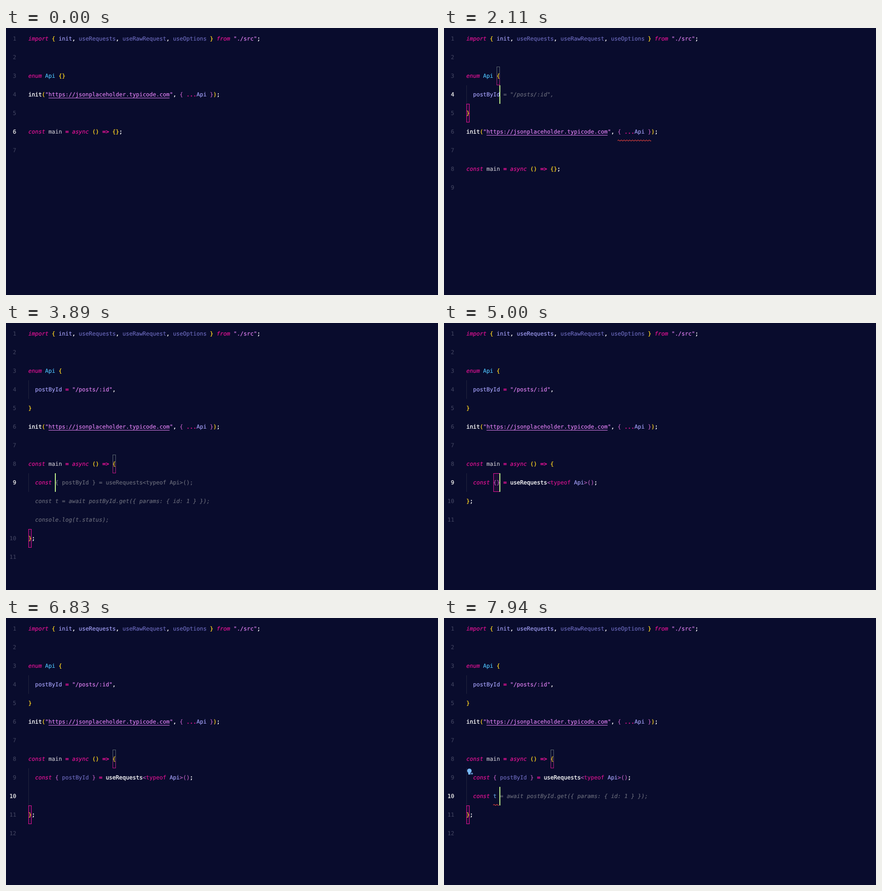
Recreate the animation shown at these times as an HTML page. Size 928 by 574 pixels, loop 8000 ms.

```html
<!DOCTYPE html>
<html lang="en">
<head>
<meta charset="utf-8">
<title>Typed API client</title>
<style>
  html, body { margin: 0; width: 100%; height: 100%; overflow: hidden; background: #090c2d; }
  svg { display: block; width: 928px; height: 574px; }
  text {
    font: 12px "DejaVu Sans Mono", "Liberation Mono", monospace;
    white-space: pre; text-rendering: geometricPrecision;
    stroke: currentColor; fill: currentColor; stroke-width: .15px;
  }
  .k { color: #f0139b; font-style: italic; }
  .p { color: #f0139b; stroke-width: .4px; }
  .q { color: #d9148f; }
  .y { color: #ffd61f; stroke-width: .3px; }
  .w { color: #fff; stroke-width: .35px; }
  .l { color: #a9a5ff; }
  .d { color: #6e6cc0; }
  .c { color: #4fc6ff; }
  .s, .u { color: #e583f7; }
  .o { color: #bf62c4; }
  .m { color: #c9c6cf; }
  .v { color: #68a9e6; }
  .h { color: #6b6d7c; font-style: italic; }
  .H { color: #6b6d7c; }
  .num { color: #40435f; text-anchor: end; }
  .num.on { color: #e2e2e2; stroke-width: .35px; }
  .info { color: #b9bac2; font-size: 10.2px; text-anchor: end; }
  .abc { color: #dcdce2; font-size: 8.5px; }
</style>
</head>
<body>
<svg id="stage" viewBox="0 0 928 574"></svg>
<script>
const LOOP = 8000, CHAR = 7.224, LEFT = 48, ROW = 40;
const stage = document.getElementById('stage');
const colX = col => LEFT + col * CHAR;
const rowY = row => 3 + (row - 1) * ROW;
const esc = s => s.replace(/&/g, '&amp;').replace(/</g, '&lt;');

// Code lines: segments split by "¦", each led by its style letter.
const importLine = lit => `kimport ¦y{ ¦linit¦w, ¦${lit ? 'l' : 'd'}useRequests¦w, ` +
  '¦duseRawRequest¦w, ¦duseOptions¦y } ¦kfrom ¦s"./src"¦w;';
const enumLine = 'kenum ¦cApi ¦y{';
const initLine = 'winit¦y(¦s"¦uhttps://jsonplaceholder.typicode.com¦s"¦w, ¦o{ ¦p...¦lApi¦o }¦y)¦w;';
const mainLine = 'kconst ¦mmain ¦p= ¦kasync ¦y() ¦p=> ¦y{';
const mainEnd = 'y}¦w;';
const call = '¦p = ¦wuseRequests¦o<¦qtypeof ¦lApi¦o>()¦w;';
const enumBody = (...body) => [enumLine, ...body, 'y}'];
const mainBody = (...body) => [mainLine, ...body, mainEnd];

// Untyped remainder of a suggestion: the current word is italic.
function ghost(typed, full, style) {
  const rest = full.slice(typed.length), word = rest.match(/^\w*/)[0];
  return `¦h${word}¦${style}${rest.slice(word.length)}`;
}
const keyword = s => (s.startsWith('const') ? 'k' : 'v') + s;

const I = (kind, name, info = '') => ({ kind, name, info });
const lists = {
  p: [I('abc', 'POST'), I('snip', 'props', 'componentProps'),
      I('snip', 'ProgressSteps component', 'ProgressSteps'),
      I('snip', 'ProgressSteps import', 'ProgressSteps import')],
  c: [I('key', 'continue'), I('var', 'context', '@/context'),
      ...['Comment', 'CompositionEvent', 'CompressionStream', 'ConstantSourceNode',
        'ContentVisibilityAutoStateChangeEvent', 'ConvolverNode', 'CountQueuingStrategy'].map(n => I('var', n))],
  post: [I('var', 'postById'), I('abc', 'POST'), I('snip', 'props', 'componentProps'),
      I('snip', 'ProgressSteps component', 'ProgressSteps'), I('var', 'PopStateEvent'), I('var', 'PointerEvent')],
  const: [I('key', 'const'), I('var', 'console'), I('key', 'continue'), I('var', 'context', '@/context'), I('var', 'Comment')],
  t: [I('key', 'this'), I('key', 'true'), I('key', 'try'), I('key', 'typeof'), I('var', 'TextEvent')]
};

const scenes = [];
function step(t, change) {
  scenes.push({ ...scenes[scenes.length - 1], pop: null, t, key: t, ...change });
}
// A change without a key press keeps the caret blink and the popup.
function react(t, change) {
  const last = scenes[scenes.length - 1];
  step(t, { key: last.key, pop: last.pop, ...change });
}

step(-500, { en: [enumLine + '}'], mn: [mainLine + '}¦w;'], lit: false, row: 6, col: 0, box: [] });
step(110, { row: 3, col: 10, box: [[3, 9, 2]] });

// Enum member
step(780, { en: enumBody('w  '), row: 4, col: 2, box: 'e' });
const posts = 'posts = "/posts",', byId = 'postById = "/posts/:id",';
react(930, { en: enumBody('w  ' + ghost('', posts, 'H'), 'h  comments = "/comments",') });
[1050, 1190, 1310, 1450, 1640, 1780, 1900, 2020].forEach((t, i) => {
  const typed = 'postById'.slice(0, i + 1), early = i < 4;
  const line = `w  ¦l${typed}` + (early ? ghost(typed, posts, 'H') : ghost(typed, byId, 'h'));
  step(t, {
    en: early ? enumBody(line, 'h  comments = "/comments",') : enumBody(line),
    col: 3 + i, pop: early ? 'p' : null, err: early ? null : [6, 45, 10]
  });
});
const member = enumBody('w  ¦lpostById ¦p= ¦s"/posts/:id"¦w,');
step(2240, { en: member, col: 26 });
step(2380, { row: 8, col: 26, box: [[8, 25, 2]] });
react(2500, { err: null });

// Request hook
const hook = 'const { postById } = useRequests<typeof Api>();';
const get = 'const t = await postById.get({ params: { id: 1 } });';
const more = ['h  ' + get, 'h  console.log(t.status);'];
step(3000, { mn: mainBody('w  '), row: 9, col: 2, box: 'm' });
[3200, 3330, 3450, 3560, 3670, 3760].forEach((t, i) => {
  const typed = 'const '.slice(0, i + 1);
  step(t, { mn: mainBody(`w  ¦${keyword(typed)}${ghost(typed, hook, 'H')}`, ...more), col: 3 + i, pop: 'c' });
});
react(3830, { pop: null });
const braces = inner => `w  ¦kconst ¦o{${inner}}`;
step(3980, { mn: mainBody(braces('') + '¦h = useRequests<typeof Api>();'), col: 9, box: [[9, 8, 2]] });
step(4400, { mn: mainBody(braces('') + call), col: 39, box: 'm' });
step(4650, { col: 10, box: [[9, 8, 2]], lit: true });
step(5280, { col: 9 });
['', 'p', 'po', 'pos', 'post'].forEach((typed, i) => {
  step(5400 + i * 110, {
    mn: mainBody(braces(` ¦d${typed}¦o`) + call), col: 10 + i,
    box: [[9, 8, 1], [9, 10 + i, 1]], pop: typed && 'post'
  });
});
const filled = braces(' ¦dpostById¦o ') + call;
step(6010, { mn: mainBody(filled), col: 18, box: [[9, 8, 1], [9, 19, 1]] });
step(6110, { col: 49, box: 'm' });
step(6180, { mn: mainBody(filled, 'w  '), row: 10, col: 2 });

// Awaited call
[6890, 7010, 7110, 7210, 7310, 7420].forEach((t, i) => {
  const typed = 'const '.slice(0, i + 1);
  step(t, {
    mn: mainBody(filled, `w  ¦${keyword(typed)}${ghost(typed, get, 'h')}`),
    col: 3 + i, pop: i < 5 ? 'const' : null
  });
});
step(7560, { mn: mainBody(filled, 'w  ¦kconst ¦vt' + ghost('const t', get, 'h')), col: 9, pop: 't' });
react(7700, { err: [10, 8, 1], bulb: true });
step(7880, { mn: mainBody(filled, 'w  ¦kconst ¦vt ' + ghost('const t ', get, 'h')), col: 10 });

const rect = (x, y, w, h, fill, extra = '') =>
  `<rect x="${x}" y="${y}" width="${w}" height="${h}" fill="${fill}" ${extra}/>`;
const label = (x, y, cls, s) => `<text x="${x}" y="${y}" class="${cls}">${esc(s)}</text>`;

function drawLine(line, row) {
  let col = 0, out = '';
  for (const part of line.split('¦')) {
    const s = part.slice(1), x = colX(col), y = rowY(row);
    if (s.trim()) out += label(x, y + 24, part[0], s);
    if (part[0] === 'u') out += rect(x, y + 147, 0, 0, 'none') + rect(x, y + 27, s.length * CHAR, 1, '#e583f7');
    col += s.length;
  }
  return out;
}

function drawBoxes(s, lines) {
  const at = line => lines.indexOf(line) + 1;
  const boxes = s.box === 'e' ? [[3, 9, 1], [at('y}'), 0, 1]]
    : s.box === 'm' ? [[at(mainLine), 25, 1], [at(mainEnd), 0, 1]] : s.box;
  return boxes.map(([row, col, n], i) => {
    const dim = typeof s.box === 'string' && i === 0;
    return rect(Math.round(colX(col)) + .5, rowY(row) + .5, Math.round(n * CHAR) - 1, 39,
      dim ? 'none' : 'rgba(240,19,155,.08)', `stroke="${dim ? 'url(#dim)' : '#f0139b'}"`);
  }).join('');
}

function drawWave([row, col, n]) {
  const x = colX(col), y = rowY(row) + 39.5;
  let d = `M${x} ${y}`;
  for (let i = 0; i < n * CHAR / 6 - .1; i++) d += 'q1.5 -3 3 -1t3 1';
  return `<path d="${d}" fill="none" stroke="#f0453f" stroke-width="1.1"/>`;
}

function drawIcon(kind, x, y) {
  if (kind === 'abc') return label(x + 3, y + 3, 'abc', 'abc');
  if (kind === 'snip') return rect(x + 4.5, y - 6.5, 12, 13, 'none',
    'stroke="#d6d6dc" stroke-dasharray="1 1"') +
    `<path d="M${x + 4.5} ${y + 6}v-12.5h12v12.5" fill="none" stroke="#d6d6dc"/>`;
  if (kind === 'key') return `<path d="M${x + 3} ${y - 3.5}h8m2 0h4M${x + 3} ${y + .5}h5m2 0h5M${x + 3} ${y + 4.5}h13"
    stroke="#d6d6dc" stroke-width="1.3"/>`;
  return `<path d="M${x + 6} ${y - 4}h-2.5v9h2.5M${x + 14} ${y - 4}h2.5v9h-2.5M${x + 6.5} ${y + .5}l4 -2.5 3.5 1.5v2.5l-4 2.5 -3.5 -1.5zl3.5 1.5 4 -2.5"
    fill="none" stroke="#78b6f2" stroke-width="1.1"/>`;
}

function drawPopup(s, above) {
  const x = Math.round(colX(s.col)) + 1, w = 430;
  const top = above ? 0 : rowY(s.row) + ROW, bottom = above ? rowY(s.row) + 1 : 574;
  const first = above ? 1 : top + 20, picked = above ? 3 : 0;
  let out = rect(x, top, w, bottom - top, '#222431');
  lists[s.pop].forEach((item, i) => {
    const y = first + i * ROW;
    if (i === picked) out += rect(x, y - 20, w, ROW, '#2f323c');
    out += drawIcon(item.kind, x, y) + label(x + 22, y + 4, 'w', item.name) +
      label(x + w - 10, y + 3.5, 'info', item.info);
  });
  if (above && s.pop === 'p') out += rect(x + w - 10, 0, 10, 26, '#3d3f4b');
  return `<clipPath id="pop">${rect(x, top, w, bottom - top, '#000')}</clipPath><g clip-path="url(#pop)">${out}</g>`;
}

const bulb = `<g fill="#78b9fa"><circle cx="54.5" cy="328.5" r="4.8"/><path d="M52 332h5v4.500h-5z"/>
  <path d="M60 331l1 2.500 2.500 1 -2.500 1 -1 2.500 -1 -2.500 -2.500 -1 2.500 -1z" stroke="#090c2d" stroke-width=".5"/></g>`;

function draw(s, caret) {
  const lines = [importLine(s.lit), '', ...s.en, initLine, '', ...s.mn, ''];
  const isGhost = line => line[0] === 'h';
  let n = 0, out = '<linearGradient id="dim" x2="0" y2="1"><stop offset=".3" stop-color="#5c6870"/>' +
    '<stop offset="1" stop-color="#d0148c"/></linearGradient>' + rect(0, 0, 928, 574, '#090c2d');
  lines.forEach((line, i) => {
    const row = i + 1, y = rowY(row);
    if (!isGhost(line)) out += label(22, y + 24, row === s.row ? 'num on' : 'num', String(++n));
    if (line.startsWith('w  ')) out += rect(48, y, 1, ROW, '#23253f');
    out += drawLine(line, row);
  });
  out += drawBoxes(s, lines);
  if (s.err) out += drawWave(s.err);
  if (s.bulb) out += bulb;
  if (s.pop) out += drawPopup(s, lines.some(isGhost));
  if (caret) out += rect(Math.round(colX(s.col)) - 1, rowY(s.row), 2, ROW, '#c3f58c');
  stage.innerHTML = out;
}

let shown = '';
function frame(now) {
  const t = now % LOOP;
  const i = scenes.findLastIndex(s => s.t <= t);
  const caret = (t - scenes[i].key) % 1000 < 500;
  const id = i + ':' + caret;
  if (id !== shown) draw(scenes[i], caret);
  shown = id;
}

const start = performance.now();
function tick() {
  frame(performance.now() - start);
  requestAnimationFrame(tick);
}
tick();
</script>
</body>
</html>
```
